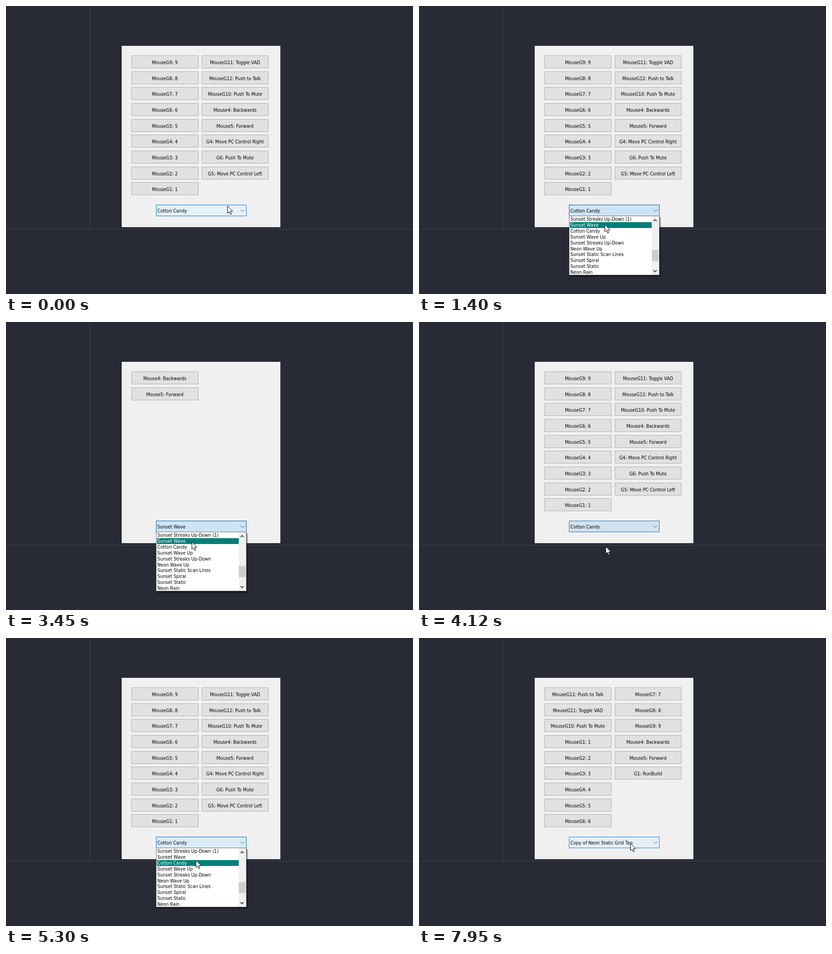
An HTML page for the animation above (8000 ms loop, 890 by 629 pixels).

```html
<!DOCTYPE html>
<html lang="en">
<head>
<meta charset="utf-8">
<title>Profile picker</title>
<style>
html, body { margin: 0; width: 100%; height: 100%; overflow: hidden; background: #282a36; }
#stage { position: relative; width: 890px; height: 629px; overflow: hidden; background: #282a36;
  font: 10.55px "DejaVu Sans Condensed", Roboto, sans-serif; color: #000; white-space: nowrap; }
#stage div, #stage svg { position: absolute; box-sizing: border-box; }
#vline { left: 183px; top: 0; width: 1px; height: 488px; background: #41434f; }
#hline { left: 0; top: 487px; width: 890px; height: 1px; background: #41434f; }
#panel { left: 253px; top: 87px; width: 347px; height: 396px;
  background: linear-gradient(#f5f2f8, #f0f0f0 7px); }
.btn { width: 146.4px; height: 28px; border: 1px solid #adadad; background: #e1e1e1;
  text-align: center; line-height: 28px; }
#combo { left: 328px; top: 434px; width: 198px; height: 25px; border: 1px solid; }
#label { left: 2px; top: 0; line-height: 24px; }
#clip { left: 328px; top: 458px; width: 202px; overflow: hidden; }
#list { left: 0; bottom: 0; width: 198px; height: 130px; background: #fff; border: 1px solid #6a6a6e; }
#list.up { bottom: 4px; box-shadow: 2px 3px 2px rgba(0, 0, 0, .5); }
.row { left: 1px; width: 179px; height: 12.87px; padding-left: 1px; line-height: 13px; }
.row.on { background: #007f78; color: #fff; outline: 1px dotted #3d938d; outline-offset: -1px; }
#bar { left: 180px; top: 0; width: 16px; height: 128px; background: #f0f0f0; }
#thumb { left: 0; width: 15px; height: 24px; background: #cdcdcd; }
svg { fill: none; overflow: visible; }
#cursor { left: 0; top: 0; width: 13px; height: 20px; fill: #fff; stroke: #000; }
</style>
</head>
<body>
<div id="stage">
  <div id="vline"></div>
  <div id="hline"></div>
  <div id="panel"></div>
  <div id="buttons"></div>
  <div id="combo">
    <div id="label"></div>
    <svg style="left:183px;top:9px" width="10" height="6" stroke="#555"><path d="M.7 .8 5 5 9.3 .8"/></svg>
  </div>
  <div id="clip">
    <div id="list">
      <div id="rows"></div>
      <div id="bar">
        <svg style="left:3px;top:6px" width="9" height="6" stroke="#505050" stroke-width="2"><path d="M.8 4.8 4.3 1.3 7.8 4.8"/></svg>
        <div id="thumb"></div>
        <svg style="left:3px;top:117px" width="9" height="6" stroke="#505050" stroke-width="2"><path d="M.8 1 4.3 4.5 7.8 1"/></svg>
      </div>
    </div>
  </div>
  <svg id="cursor"><path d="M.5 .5V16.4L4.1 13 6.6 19 9 18 6.5 12.1H11.7Z"/></svg>
</div>
<script>
const $ = id => document.getElementById(id);
const LOOP = 8000, TICK = 60, LIST_TOP = 459.2, PITCH = 12.87, ROWS = 10;

const digits = [...Array(9)].map((_, i) => `MouseG${i + 1}: ${i + 1}`);
const toggle = 'MouseG11: Toggle VAD', talk = 'MouseG12: Push to Talk', mute = 'MouseG10: Push To Mute';
const nav = ['Mouse4: Backwards', 'Mouse5: Forward'];
const candy = { name: 'Cotton Candy', keys: [...digits.slice().reverse(), toggle, talk, mute, ...nav,
  'G4: Move PC Control Right', 'G6: Push To Mute', 'G5: Move PC Control Left'] };
const wave = { name: 'Sunset Wave', keys: nav };
const grid = { name: 'Copy of Neon Static Grid Tap',
  keys: [talk, toggle, mute, ...digits, ...nav, 'G1: RunBuild'] };

// Three pages of the list
const hardware = [1, 2, 3].map(n => `Tavrelin Max HW ${n}`);
const middle = ['Spiral', 'Static', 'Rain', 'Wave Left', 'Wave Down'].flatMap(s => [`Neon ${s}`, `Sunset ${s}`]);
const names = [...hardware, 'Neon Static Grid Tap', 'Neon Wave Down', 'Neon Wave Right', 'Neon Streaks Up-Down',
  'Default', grid.name, 'Neon Wave Left', ...middle,
  'Sunset Streaks Up-Down (1)', wave.name, candy.name, 'Sunset Wave Up', 'Sunset Streaks Up-Down',
  'Neon Wave Up', 'Sunset Static Scan Lines', 'Sunset Spiral', 'Sunset Static', 'Neon Rain'];

// The list opens, then a profile is picked
const visits = [
  { open: 470, pick: 1760, profile: wave },
  { open: 2780, pick: 4060, profile: candy },
  { open: 4960, pick: 7370, profile: grid }
];
const moves = [
  { at: 1100, dur: 300, x: 406, y: 477 },
  { at: 1880, dur: 440, x: 424, y: 449 },
  { at: 3020, dur: 420, x: 406, y: 480 },
  { at: 3580, dur: 170, x: 408, y: 490 },
  { at: 4150, dur: 380, x: 429, y: 449 },
  { at: 4960, dur: 340, x: 415, y: 485 },
  { at: 6580, dur: 400, x: 430, y: 569 },
  { at: 7430, dur: 520, x: 462, y: 448 }
];

// Combo box colours: fill r, g, b, then border r, g, b
const hot = [229, 241, 251, 0, 120, 215], down = [204, 228, 247, 0, 84, 153], idle = [225, 225, 225, 173, 173, 173];

const clamp = u => Math.max(0, Math.min(1, u));
const ramp = (t, from, to) => clamp((t - from) / (to - from));
const mix = (a, b, u) => a.map((v, i) => v + (b[i] - v) * u);
const easeOut = u => 1 - (1 - u) ** 2;

function pointer(t) {
  let pos = [484, 436];
  for (const { at, dur, x, y } of moves) {
    if (t < at) break;
    const age = t - at;
    const u = age >= dur ? 1 : Math.floor(age / TICK + .01) * TICK / dur;
    pos = mix(pos, [x, y], easeOut(u));
  }
  return pos;
}

function shade(t, visit) {
  if (!visit) return hot;
  if (t < visit.pick) return mix(hot, down, ramp(t - visit.open, 170, 520));
  const age = t - visit.pick;
  return age < 300 ? mix(down, idle, ramp(age, 0, 250)) : mix(idle, hot, ramp(age, 320, 620));
}

function addText(parent, cls, text, left, top) {
  const el = document.createElement('div');
  el.className = cls;
  el.textContent = text;
  el.style.left = left + 'px';
  el.style.top = top + 'px';
  parent.append(el);
  return el;
}

const rows = names.slice(0, ROWS).map((s, i) => addText($('rows'), 'row', s, 1, i * PITCH + .2));
let profile, page;

function setProfile(p) {
  if (p === profile) return;
  profile = p;
  $('label').textContent = p.name;
  $('buttons').replaceChildren();
  p.keys.forEach((s, i) => addText($('buttons'), 'btn', s, i < 9 ? 274.2 : 427.6, 108 + i % 9 * 34.67));
}

function setPage(n) {
  if (n === page) return;
  page = n;
  rows.forEach((r, i) => { r.textContent = names[n * ROWS + i]; });
  $('thumb').style.top = 17 + 28.5 * n + 'px';
}

function drawList(age, y) {
  const u = clamp(age / 170);
  $('clip').style.height = (u < 1 ? 10 + 120 * u : 134) + 'px';
  $('list').className = u < 1 ? '' : 'up';
  const on = y > LIST_TOP ? Math.floor((y - LIST_TOP) / PITCH) : names.indexOf(profile.name) - page * ROWS;
  rows.forEach((r, i) => r.classList.toggle('on', i === on));
}

function draw() {
  const t = performance.now() % LOOP;
  const [x, y] = pointer(t);
  const visit = visits.filter(v => v.open <= t).pop();
  const picked = visits.filter(v => v.pick <= t).pop();
  setProfile(picked ? picked.profile : candy);
  setPage(t < 5900 ? 2 : t < 5970 ? 1 : 0);

  const c = shade(t, visit);
  $('combo').style.background = `rgb(${c.slice(0, 3)})`;
  $('combo').style.borderColor = `rgb(${c.slice(3)})`;

  const open = visit && t < visit.pick;
  $('clip').style.display = open ? 'block' : 'none';
  if (open) drawList(t - visit.open, y);
  $('cursor').style.transform = `translate(${Math.round(x)}px, ${Math.round(y)}px)`;
  requestAnimationFrame(draw);
}
draw();
</script>
</body>
</html>
```
